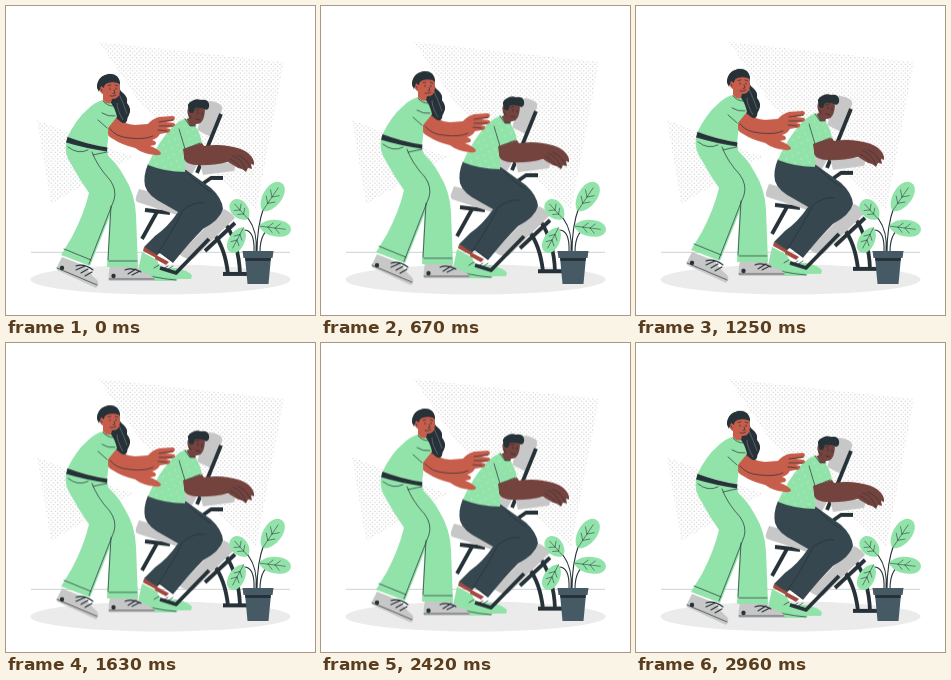
An HTML page that plays this animation: 309 px wide and 309 px high, repeating every 3 s.

```html
<!DOCTYPE html>
<html lang="en">
<head>
<meta charset="utf-8">
<title>Chair massage</title>
<style>
html, body { margin: 0; width: 100%; height: 100%; overflow: hidden; background: #fff; }
svg { display: block; width: 100vw; height: 100vh; }
.green { fill: #92e3a9; }
.dark { fill: #263238; }
.pants { fill: #37474f; }
.pot { fill: #455a64; }
.grey { fill: #c7c7c7; }
.skin { fill: #c75e4c; }
.brown { fill: #74433e; }
.sock { fill: #a34a40; }
.line { fill: none; stroke: #263238; stroke-width: .7; stroke-linecap: round; stroke-linejoin: round; }
.bold { stroke-width: 1.1; }
.vein { stroke-width: .5; }
.bar { fill: none; stroke: #263238; stroke-width: 3.8; stroke-linejoin: round; }
</style>
</head>
<body>
<svg viewBox="0 0 309 309">
  <defs>
    <pattern id="dots" width="4.4" height="4.4" patternUnits="userSpaceOnUse">
      <circle cx="1.1" cy="1.1" r=".6" fill="#c4c4c4"/>
      <circle cx="3.3" cy="3.3" r=".6" fill="#c4c4c4"/>
    </pattern>
    <pattern id="specks" width="9" height="10" patternUnits="userSpaceOnUse" patternTransform="rotate(20)">
      <circle cx="2" cy="2" r=".6" fill="#d8f6df"/>
      <circle cx="6.5" cy="7" r=".6" fill="#d8f6df"/>
    </pattern>
    <path id="torso" d="M180 112Q167 117 158 131Q147 146 142 159Q159 166 179 166Q180 153 180 144L196 137Q194 126 189 120L184 120Z"/>
  </defs>

  <path fill="url(#dots)" d="M93 36 278 56 250 205 136 100Z"/>
  <path fill="url(#dots)" d="M31 114 45 198 128 150 118 148Z"/>
  <path d="M25 246.3H284" stroke="#aab0b3" stroke-width=".6"/>
  <ellipse cx="154.500" cy="273.500" rx="130" ry="15" fill="#ebebeb"/>

  <g id="people">
    <!-- chair -->
    <path class="bar" d="M208 228Q219 242 222 268M219 217Q233 238 234 268M217 268H242"/>
    <path class="bar" d="M139 204 164 207M151 206 136 233"/>
    <path class="grey" d="M203 95Q209 95 215 99Q217 101 216 104L207 130Q206 132 203 130L193 125Q191 124 192 121Z"/>
    <path class="bar" d="M215 108 191 167M217 172H205L188 184"/>
    <path class="grey" d="M183 150 194 154 186 168 174 164Z"/>
    <path class="grey" d="M194 157H228Q230 161 228 165L197 169Z"/>
    <path class="grey" d="M133 183 174 194 171 209 131 196Q129 194 130 191Z"/>
    <path class="grey" d="M218 203Q225 206 229 212L187 253Q179 254 173 248Z"/>
    <path class="bar" d="M229 217 199 245"/>

    <!-- seated man: shoes and legs -->
    <path class="green" d="M136 246 151 254 154 261 171 268Q174 272 170 275L146 275Q131 270 132 265Z"/>
    <path class="green" d="M147 256 159 262 170 262Q184 265 186 270L185 273H158Q146 271 145 265Z"/>
    <path class="line" d="M157 263 162 260M161 264 167 260M148 262 153 259M134 266Q145 272 170 274"/>
    <path class="sock" d="M138 241 152 248 150 252 137 245Z"/>
    <path class="sock" d="M150 249 163 256 160 259 149 253Z"/>
    <path class="pants" d="M142 158Q137 170 139 180Q142 190 158 198L172 206Q162 221 149 230L138 241 151 249 154 247 167 257Q183 237 197 223Q214 214 217 203Q216 192 205 182L180 164Z"/>
    <path class="line" d="M176 205Q188 195 198 197M176 206Q168 223 152 247M183 168Q192 178 205 186M153 246 166 255"/>
    <path class="bar" d="M154 262 170 267 203 233"/>

    <!-- seated man: head, shirt, arms -->
    <path class="brown" d="M184 101Q180 103 182 109L183 112 179 114 182 122 189 121 190 118Q198 119 199 104L196 98Z"/>
    <path class="dark" d="M183 105Q180 97 186 95Q190 92 195 94Q202 93 203 98Q204 103 200 104Q196 101 189 102L187 107 184 107Z"/>
    <path class="line" d="M192 106V108M196 107V109M190 104 193 103M190 113 194 114M183 109 185 112"/>
    <use href="#torso" class="green"/>
    <use href="#torso" fill="url(#specks)"/>
    <path class="line" d="M173 123Q176 133 179 143L194 137M179 113 184 120 189 120"/>
    <path class="brown" d="M177 143 196 137 198 140Q211 138 222 140Q236 142 242 147Q249 153 248 159L245 158 246 163 242 162 240 166 236 163 232 162 222 156Q205 160 190 159Q177 158 178 150Z"/>
    <path class="line" d="M227 150Q235 152 240 164M232 149Q240 152 244 161M224 153Q232 157 236 163" stroke-opacity=".7"/>

    <!-- masseuse: shoes and trousers -->
    <path class="grey" d="M104 260 131 261Q135 266 145 269Q149 272 148 275L103 275Q102 269 104 260Z"/>
    <path class="grey" d="M56 251 79 260Q83 267 91 274Q94 278 90 282L51 264Q50 262 52 259Z"/>
    <circle class="dark" cx="107.500" cy="270" r="2.200"/>
    <circle class="dark" cx="56" cy="262" r="2.200"/>
    <path class="line" d="M103 273H148M51 262 91 279"/>
    <path class="line bold" d="M119 264Q126 261 135 266M122 268 130 263M126 269 134 265M70 260Q78 257 87 264M70 264 79 260M75 267 82 263M79 270 86 266"/>
    <path class="green" d="M94 143Q111 156 119 172Q129 188 130 209L132 261 101 261 105 180Z"/>
    <path class="green" d="M60 136Q58 148 65 158Q73 173 83 187Q78 208 66 231L55 249 84 260 107 202Q111 190 107 176L101 144Z"/>
    <path class="line" d="M86 146Q91 160 104 174Q111 184 108 194L83 258M105 200 102 254M58 243 85 254M103 255H131M62 141Q72 149 82 144M87 149Q96 147 101 146"/>

    <!-- masseuse: arms -->
    <path class="skin" d="M101 118Q105 129 113 132L146 134Q152 136 149 139L144 140Q152 143 155 147Q155 150 149 149Q137 148 129 142Q116 139 107 133Q96 127 101 118Z"/>
    <path class="skin" d="M101 121 109 111Q118 118 129 119L142 118Q146 113 153 111L167 110Q171 112 167 115L160 116 168 117Q171 120 166 121L160 122 164 123Q165 127 160 127L154 128Q150 135 142 134Q127 137 114 134Q104 130 101 121Z"/>
    <path class="line" d="M104 123Q110 131 123 132Q139 134 147 130M153 116 167 114M153 120 166 120M152 124 161 125"/>

    <!-- masseuse: hair, shirt, face -->
    <path class="dark" d="M91 81Q92 69 104 68Q113 68 114 77Q112 84 117 87Q122 91 121 97Q126 103 123 109Q121 112 121 115Q119 119 115 116Q109 112 106 107L102 94Z"/>
    <path class="green" d="M97 94Q89 96 82 103Q70 113 61 132L101 142Q103 132 102 122L111 111Q109 102 105 97Z"/>
    <path class="skin" d="M97 80Q93 79 94 85Q95 88 97 88L97 94Q101 99 105 97L106 93Q113 94 114 85L113 76 103 75Z"/>
    <path class="dark" d="M91 82Q91 70 103 68Q113 68 114 78Q108 75 102 77Q98 78 98 82L95 80 93 86Z"/>
    <path class="line" d="M104 82V83.500M110 82V83.500M102 79.500 105 79M109 79 112 80M108 84 109 87 107 87.500M104 90Q107 91 110 89M95 83 96 85"/>
    <path class="line" d="M97 95Q101 100 107 100M96 107Q102 111 109 110M101 122 92 114"/>
    <path d="M113 88Q118 99 121 108M111 97Q111 104 117 114" fill="none" stroke="#87939a" stroke-width=".5"/>
    <path class="dark" d="M61.500 131Q80 138 101.500 141.500L101 145.500Q78 142 60 136.500Z"/>
  </g>

  <!-- plant -->
  <path class="line bold" d="M251 246Q251 220 258 201M254 246Q254 224 268 221M250 246Q252 226 242 212M248 246Q249 223 237 224"/>
  <g id="leaves"></g>
  <path class="pot" d="M239 251H265L262.500 278H241.500Z"/>
  <path class="dark" d="M239 251H265L264.500 255H239.500Z"/>
  <path class="pot" d="M236.500 245H267.500L266.500 252H237.500Z"/>
</svg>
<script>
const leaves = document.getElementById('leaves');

// x, y, half width, half length, angle from upright
[
  [266, 191, 9.5, 17, 34],
  [234, 204, 8.5, 12, -42],
  [269, 222, 8.5, 16, 97],
  [231, 234, 8, 14, 208]
].forEach(([x, y, w, h, turn]) => {
  const vein = k => `M0 ${h * k}L${w * .55} ${h * (k - .3)}M0 ${h * k}L${-w * .55} ${h * (k - .3)}`;
  leaves.innerHTML += `<g transform="translate(${x} ${y}) rotate(${turn})">
    <path class="green" d="M0 ${h}C${-w * 1.35} ${h * .65} ${-w * 1.3} ${-h} 0 ${-h}C${w * 1.3} ${-h} ${w * 1.35} ${h * .65} 0 ${h}"/>
    <path class="line vein" d="M0 ${h}V${-h * .65}${vein(.45)}${vein(0)}"/></g>`;
});

document.getElementById('people').animate(
  [0, -6.18, 0].map(y => ({ transform: `translateY(${y}px)` })),
  { duration: 3000, iterations: Infinity, easing: 'linear' }
);
</script>
</body>
</html>
```
